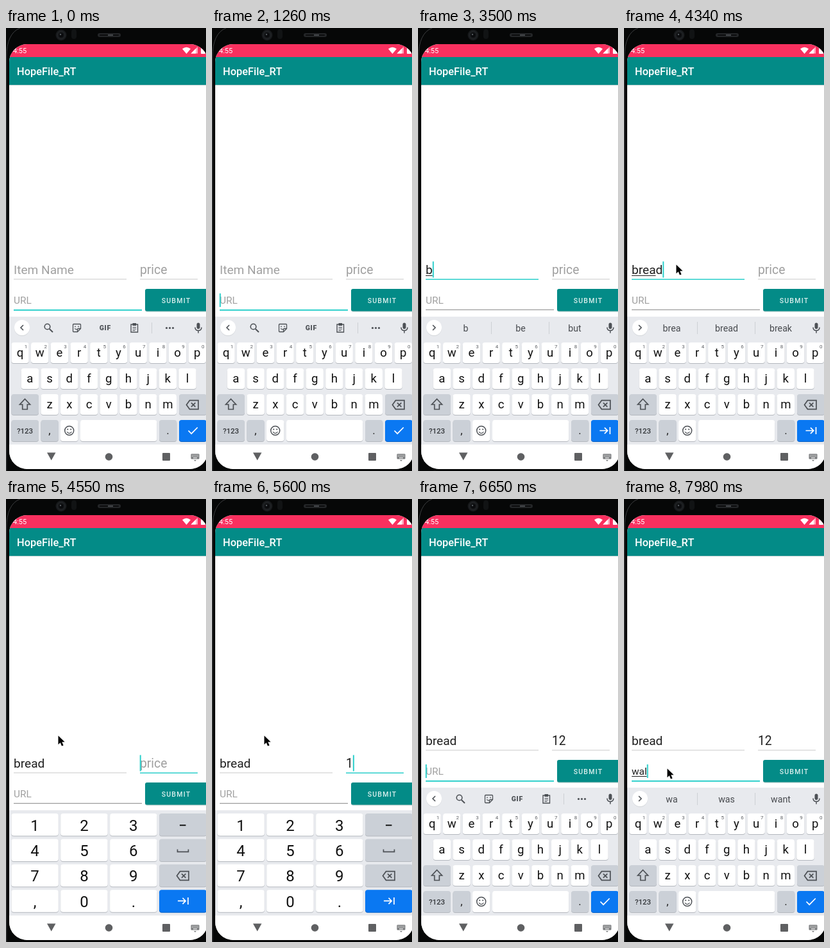
Animation, 312 px wide and 686 px high, one loop 8 s. Source, as an HTML page with a canvas:

```html
<!DOCTYPE html>
<html lang="en">
<head>
<meta charset="utf-8">
<title>Shopping form</title>
<style>
html, body { margin: 0; width: 100%; height: 100%; overflow: hidden; background: #000; }
canvas { display: block; width: 312px; height: 686px; }
</style>
</head>
<body>
<canvas id="stage"></canvas>
<script>
const W = 312, H = 686, LOOP = 8000, SHIFT = 35;
const canvas = document.getElementById('stage');
const ratio = window.devicePixelRatio || 1;
canvas.width = W * ratio;
canvas.height = H * ratio;
const c = canvas.getContext('2d');

const TEAL = '#038b87', ACCENT = '#2ccfcb', INK = '#1f1f1f', HINT = '#a0a0a0';
const KEY_GREY = '#cbd0d7', ICON = '#4d5156', BLUE = '#0a78f2', NAV = '#5f6062';

function text(str, x, y, size, color, align = 'left', weight = 400, spacing = 0) {
  c.font = `${weight} ${size}px Roboto, sans-serif`;
  c.textAlign = align;
  c.letterSpacing = spacing + 'px';
  c.fillStyle = color;
  c.fillText(str, x, y);
  c.letterSpacing = '0px';
}

function rect(x, y, w, h, color) {
  c.fillStyle = color;
  c.fillRect(x, y, w, h);
}

function box(x, y, w, h, r, color) {
  c.fillStyle = color;
  c.beginPath();
  c.roundRect(x, y, w, h, r);
  c.fill();
}

function disc(x, y, r, color) {
  c.fillStyle = color;
  c.beginPath();
  c.arc(x, y, r, 0, 7);
  c.fill();
}

function ring(x, y, r, color, width) {
  c.strokeStyle = color;
  c.lineWidth = width;
  c.beginPath();
  c.arc(x, y, r, 0, 7);
  c.stroke();
}

const fillPath = (d, color) => { c.fillStyle = color; c.fill(new Path2D(d)); };

function line(d, color, width = 1.5) {
  c.strokeStyle = color;
  c.lineWidth = width;
  c.stroke(new Path2D(d));
}

function at(x, y, draw) {
  c.save();
  c.translate(x, y);
  draw();
  c.restore();
}

// Each entry is [start, value]; the last one that has started wins.
function pick(track, t) {
  let value = track[0][1];
  for (const [start, v] of track) if (t >= start) value = v;
  return value;
}

const focusTrack = [[0, 'url'], [2310, 'name'], [4550, 'price'], [6650, 'url']];
const caretTrack = [[0, 0], [280, 1], [700, 0], [1260, 1], [1820, 0], [2310, 1], [2800, 0],
  [3290, 1], [5040, 0], [5600, 1], [6300, 0], [6650, 1]];
const nameTrack = [[0, ''], [3290, 'b'], [3570, 'br'], [3850, 'bre'], [4060, 'brea'], [4340, 'bread']];
const priceTrack = [[0, ''], [5600, '1'], [5810, '12']];
const urlTrack = [[0, ''], [7000, 'w'], [7350, 'wa'], [7770, 'wal']];
const wordTrack = [[0, ''], [3430, 'b be but'], [3710, 'br bro bring'], [4200, 'brea bread break'],
  [4550, ''], [7210, 'w we was'], [7560, 'wa was want']];
const mouseTrack = [[0, null], [4340, [81, 366]], [6160, null], [7980, [67, 417]]];
const markTrack = [[0, 0], [3430, 1], [3710, 2], [4060, 3], [4200, 4], [4550, 0], [7210, 1], [7560, 2], [7980, 3]];

function drawBody() {
  rect(0, 0, W, H, '#060707');
  line('M.8 686V45Q1 8 22 0', '#3a3c3e', 1);
  disc(86, 11, 8.5, '#17191b');
  ring(86, 11, 6, '#26292c', 1);
  disc(86, 11, 3.5, '#0a0b0d');
  disc(85, 10, 1.2, '#565b60');
  box(102, 2, 8, 15, 4, '#111314');
  box(143, 8, 36, 6, 3, '#242628');
  box(146, 10, 30, 2, 1, '#0c0d0e');
  rect(159, 10, 8, 2, '#44474a');
}

function drawHeader() {
  rect(5, 25, 310, 20, '#f9305f');
  text('4:55', 11, 39, 11, '#fff');
  fillPath('M275 32.3Q281.5 27.3 288 32.3L281.5 40Z', '#fff');
  fillPath('M299 29V39.5H288.5Z', '#ffb3c6');
  fillPath('M296 32V39.5H288.5Z', '#fff');
  box(304, 30, 7, 10, 1, '#fff');
  rect(306, 29, 3, 1, '#fff');
  rect(5, 45, 310, 43, TEAL);
  rect(5, 88, 310, 1, '#b8cfce');
  text('HopeFile_RT', 17, 73, 16.4, '#fff', 'left', 500);
}

function drawField(f, value, focused, caret, mark) {
  const base = f.y;
  text(value || f.hint, f.x, base, f.size, value ? INK : HINT);
  const width = value ? c.measureText(value).width : 0;
  if (mark) rect(f.x, base + 2, c.measureText(value.slice(0, mark)).width, 1, INK);
  const bold = focused ? (f.id === 'url' ? 2 : 1.5) : 1;
  rect(f.x, f.line, f.w, bold, focused ? ACCENT : f.rule);
  if (focused && caret) rect(f.x + width - (width ? 0 : .3), f.top, 2, f.caret, ACCENT);
}

const fields = [
  { id: 'name', hint: 'Item Name', x: 12, w: 176, y: 381, size: 19.1, line: 388.5, top: 361.5, caret: 25, rule: '#c9c9c9' },
  { id: 'price', hint: 'price', x: 209, w: 90, y: 381, size: 19.3, line: 388.5, top: 361.5, caret: 25, rule: '#c9c9c9' },
  { id: 'url', hint: 'URL', x: 12, w: 200, y: 427, size: 15.4, line: 435.8, top: 411, caret: 21, rule: '#858585' }
];

function drawForm(t, focus) {
  const values = { name: pick(nameTrack, t), price: pick(priceTrack, t), url: pick(urlTrack, t) };
  for (const f of fields) {
    const on = f.id === focus;
    drawField(f, values[f.id], on, pick(caretTrack, t), on && f.id !== 'price' ? pick(markTrack, t) : 0);
  }
  box(217, 405, 98, 34.5, 3, '#b5c9c8');
  box(217, 404, 98, 34.5, 3, TEAL);
  text('SUBMIT', 265.5, 426, 10.6, '#d9efed', 'center', 500, 1.2);
}

function key(x, y, w, h, color = '#fff') {
  box(x, y + 1, w, h, 4, color === BLUE ? '#0961c4' : '#b4b8be');
  box(x, y, w, h, 4, color);
}

function backspace(x, y) {
  at(x, y, () => {
    line('M-9.5 0L-4.5-6.8H9V6.8H-4.5Z', ICON, 1.7);
    line('M-2-3.2L4.4 3.2M4.4-3.2L-2 3.2', ICON, 1.7);
  });
}

function enterKey(x, y, w, h, tab) {
  key(x, y, w, h, BLUE);
  at(x + w / 2, y + h / 2, () => {
    if (tab) line('M-8 0H4M-.5-4.7L4.2 0L-.5 4.7M8-5.5V5.5', '#fff', 1.7);
    else line('M-7 0L-2.3 4.7L7.3-5', '#fff', 1.7);
  });
}

function drawTools(words) {
  disc(25, 465, 12, '#d3d6da');
  disc(25, 464, 12, '#fff');
  line(words ? 'M23 460L27 464L23 468' : 'M27 460L23 464L27 468', ICON, 1.6);
  box(297.5, 456.5, 5, 9.5, 2.5, ICON);
  line('M295 463.5Q295 468.5 300 468.5T305 463.5M300 468.5V472.5', ICON, 1.5);
  if (words) {
    words.split(' ').forEach((w, i) => text(w, [74.5, 160, 244.5][i], 470, 14.2, '#484b4f', 'center'));
    rect(114, 455, 1, 19, '#cdd0d4');
    rect(204, 455, 1, 19, '#cdd0d4');
    return;
  }
  ring(64.5, 462.5, 4.3, ICON, 1.6);
  line('M67.8 466L73 471', ICON, 1.9);
  line('M105.5 458.5H115.5Q116.5 458.5 116.5 459.5V465.5L111.5 470.5H105.5Q104.5 470.5 104.5 469.5V459.5Q104.5 458.5 105.5 458.5M116 465.5H112.5Q111.5 465.5 111.5 470', ICON, 1.3);
  line('M107.3 465.2Q109.5 468 111.5 466', ICON, 1.1);
  disc(108, 462.3, .9, ICON);
  disc(113, 462.3, .9, ICON);
  text('GIF', 154.8, 468.3, 10.5, ICON, 'center', 900, .7);
  line('M195 459H205.5V471H195Z', ICON, 1.4);
  rect(197.5, 457, 5.5, 4, ICON);
  line('M197.5 463.5H203M197.5 466H203M197.5 468.5H201.5', ICON, 1);
  rect(227, 456, 1, 17, '#cdd0d4');
  for (const x of [250.5, 255.5, 260.5]) disc(x, 464.5, 1.6, ICON);
}

function drawLetters(t, tab) {
  rect(5, 447, 310, 198, '#e8eaee');
  drawTools(pick(wordTrack, t));
  const rows = [['qwertyuiop', 22, 487], ['asdfghjkl', 37.4, 527], ['zxcvbnm', 68.1, 567]];
  for (const [letters, start, y] of rows) {
    [...letters].forEach((ch, i) => {
      const x = start + i * 30.7;
      key(x - 13.7, y, 27.4, 32);
      text(ch, x, y + 22, 18.6, '#111', 'center');
      if (y === 487) text((i + 1) % 10, x + 9, y + 9, 8, '#5c5f63', 'center');
    });
  }
  key(8.3, 567, 42.7, 32, KEY_GREY);
  line('M29.5 574.5L37.5 583H33.3V590.5H25.7V583H21.5Z', ICON, 1.7);
  key(270, 567, 43, 32, KEY_GREY);
  backspace(291, 583.5);
  key(8.3, 607, 42.7, 33, KEY_GREY);
  text('?123', 29.5, 627.5, 11.5, '#33363a', 'center', 500);
  key(54.4, 607, 27.4, 33, KEY_GREY);
  text(',', 68, 629, 17, '#222', 'center');
  key(85, 607, 27.4, 33);
  ring(98.7, 623.5, 7, ICON, 1.5);
  disc(96.2, 621.5, 1.1, ICON);
  disc(101.2, 621.5, 1.1, ICON);
  line('M95 625.3Q98.7 629.8 102.4 625.3', ICON, 1.3);
  key(116, 607, 119.3, 33);
  key(239, 607, 27.4, 33, KEY_GREY);
  text('.', 252.6, 629, 17, '#222', 'center');
  enterKey(270, 607, 43, 33, tab);
}

function drawDigits() {
  rect(5, 482, 310, 163, '#e8eaee');
  ['123', '456', '789', ',0.'].forEach((row, r) => {
    const y = 487 + r * 39.4;
    [...row].forEach((ch, i) => {
      const x = 8.3 + i * 76.9;
      key(x, y, 73.5, 34.5);
      text(ch, x + 36.7, y + 26.5, 24, '#111', 'center');
    });
    if (r < 3) key(239, y, 74, 34.5, KEY_GREY);
    else enterKey(239, y, 74, 34.5, true);
  });
  rect(271, 504.3, 9.5, 1.9, '#111');
  line('M267.5 542.5V546.3H284.5V542.5', ICON, 1.7);
  backspace(276, 583.5);
}

function drawNav() {
  rect(5, 645, 310, 40, '#fff');
  fillPath('M64 657.5H77.5L70.7 669.5Z', NAV);
  disc(160.5, 664, 5.8, NAV);
  box(244, 658, 12, 12, 1, NAV);
  box(288.5, 659.5, 13, 8, 1, '#77797b');
  for (let i = 0; i < 10; i++) rect(290 + (i % 5) * 2.2, 661 + (i > 4) * 2.1, 1.1, 1.1, '#fff');
  rect(292, 665.3, 6, 1, '#fff');
  fillPath('M293 669H297L295 671Z', '#77797b');
}

function drawMouse([x, y]) {
  at(x, y, () => {
    const d = 'M.5 .5V14.2L3.7 11.2L6 16.6L8.6 15.5L6.3 10.3H10.6Z';
    line(d, '#fff', 1.6);
    fillPath(d, '#000');
  });
}

function draw(t) {
  const focus = pick(focusTrack, t), digits = focus === 'price';
  c.setTransform(ratio, 0, 0, ratio, 0, 0);
  drawBody();
  c.save();
  c.beginPath();
  c.roundRect(5, 25, 310, 658, 28);
  c.clip();
  rect(5, 25, 310, 658, '#fff');
  drawHeader();
  at(0, digits ? SHIFT : 0, () => drawForm(t, focus));
  if (digits) drawDigits();
  else drawLetters(t, t >= 2450 && t < 6650);
  drawNav();
  c.restore();
  const mouse = pick(mouseTrack, t);
  if (mouse) drawMouse(mouse);
}

const begin = performance.now();
function tick() {
  draw((performance.now() - begin) % LOOP);
  requestAnimationFrame(tick);
}
tick();
</script>
</body>
</html>
```
